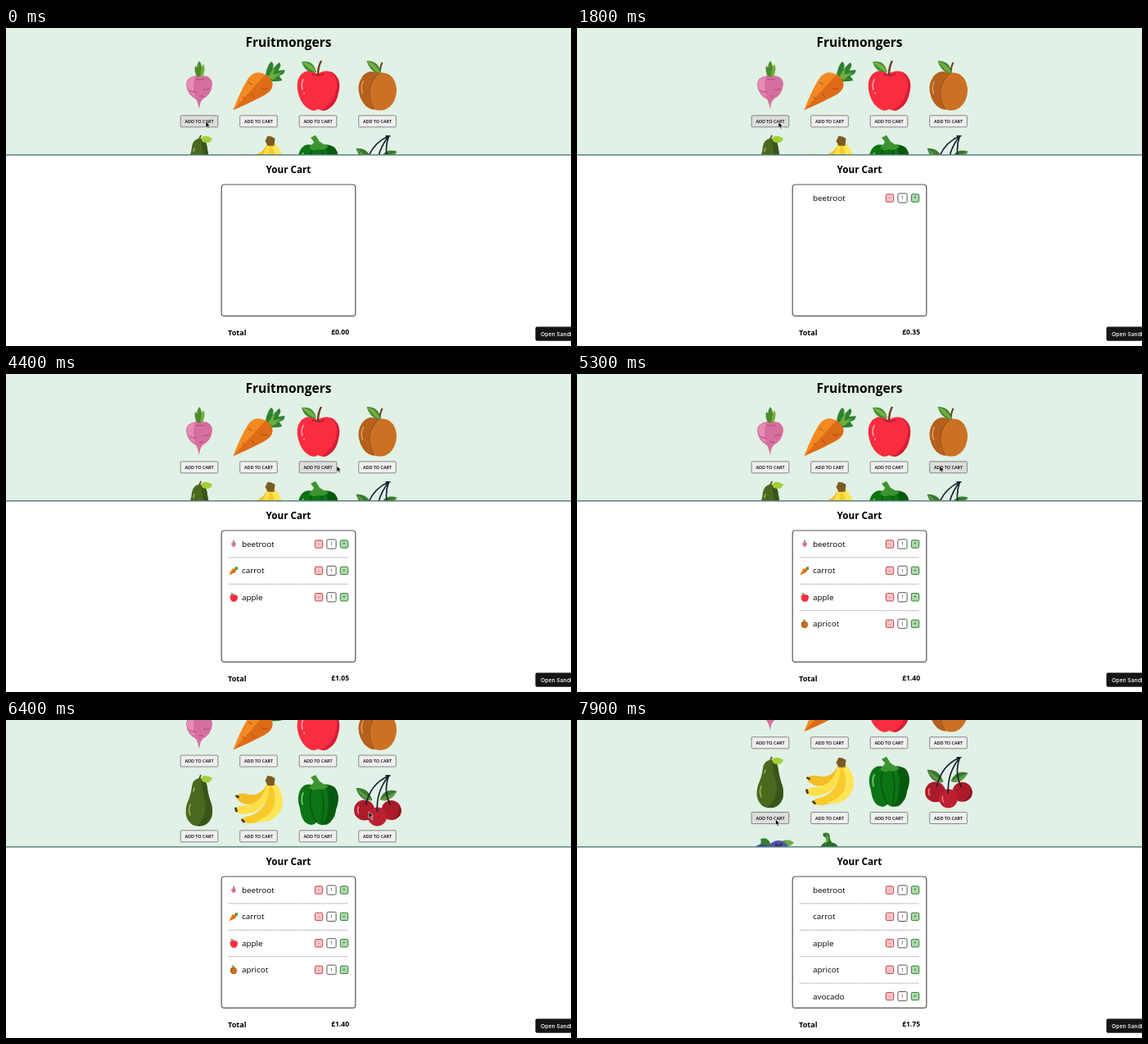
Animation of 690 by 388 pixels, one loop 8000 ms. Source, as an HTML page:

```html
<!DOCTYPE html>
<html lang="en">
<head>
<meta charset="utf-8">
<title>Shopping cart</title>
<style>
html, body { margin: 0; width: 100%; height: 100%; overflow: hidden; background: #fff; }
svg { display: block; width: 100%; height: 100%; }
text { font-family: "Open Sans", "Noto Sans", sans-serif; fill: #000; }
.bold { font-weight: 700; }
.mid { text-anchor: middle; }
.btn rect { fill: #efefef; stroke: #6c6c6c; stroke-width: .8; }
.btn.hover rect { fill: #dcdedc; }
.btn text { font-size: 5.45px; font-weight: 600; }
.step { font-size: 5px; }
</style>
</head>
<body>
<svg id="stage" viewBox="0 0 690 388">
  <defs>
    <clipPath id="shop"><rect width="690" height="154.5"/></clipPath>

    <g id="beetroot">
      <path fill="#4d8a2c" d="M-2-9Q-7-18-5-24Q0-21 0-10ZM-1-10Q-5-24 0-30Q5-25 2-10Z"/>
      <path fill="#76ad38" d="M1-9Q2-22 5-26Q9-20 3-9Z"/>
      <path fill="#d76f9e" d="M-4-12Q0-9 5-12Q16-11 16-1Q15 11 4 17Q1 20 0 29Q-2 20-4 17Q-15 11-16-1Q-16-10-4-12Z"/>
      <path fill="#e58db5" d="M-5-11Q-15-9-15-1Q-13 9-5 14Q-9 0-5-11Z"/>
      <path fill="none" stroke="#a94679" stroke-width="1" d="M5 5Q9 6 12 4M-12 6Q-8 9-4 8M0 13H5M-4-8Q1-5 6-8"/>
    </g>

    <g id="carrot">
      <path fill="#2f8132" d="M8-8Q9-22 15-29Q20-27 17-20L25-28Q29-26 24-18L32-19Q32-13 25-12L29-6Q21-4 13-5Z"/>
      <path fill="#70ae3c" d="M11-9L20-24L18-13L28-16L18-7Z"/>
      <path fill="#f28a22" d="M-31 30Q-22 6-13-8Q-6-18 4-15Q15-12 17-1Q17 7 5 13Q-12 22-31 30Z"/>
      <path fill="#de6b18" d="M-31 30L8-13Q17-8 17-1Q17 7 5 13Q-12 22-31 30Z"/>
      <path fill="none" stroke="#ad4812" stroke-width="1" d="M3 3Q6 6 11 4M-9 10L-5 15M-13 -4L-8-1M-20 14L-16 17"/>
    </g>

    <g id="apple">
      <path fill="#f92c40" d="M-1-14Q-12-22-21-13Q-28-4-24 10Q-20 25-9 30Q-4 32 0 29Q5 32 10 30Q22 24 25 9Q29-6 20-14Q11-21-1-14Z"/>
      <path fill="#d81d36" d="M14-17Q24-12 23 1Q21 20 5 30Q9 32 14 28Q23 22 25 9Q29-6 20-14Q17-17 14-17Z"/>
      <path fill="none" stroke="#8e1525" stroke-width="1.2" d="M-7-14Q0-10 8-14"/>
      <path fill="none" stroke="#6b3b22" stroke-width="2.4" d="M0-12Q0-23 4-30"/>
      <path fill="#3b8a32" d="M-20-29Q-5-31-2-16Q-16-15-20-29Z"/>
      <path fill="#76b342" d="M-20-29Q-6-27-2-16Q-10-18-20-29Z"/>
      <path fill="none" stroke="#ff9aa2" stroke-width="1.7" stroke-linecap="round" d="M-18-7Q-21-2-19 5M-17 9V10"/>
    </g>

    <g id="apricot">
      <path fill="#cb7123" d="M2-15Q-11-20-18-11Q-26 0-21 14Q-16 28-1 30Q14 33 21 18Q27 3 19-9Q12-17 2-15Z"/>
      <path fill="#b5601c" d="M2-15Q-11-20-18-11Q-26 0-21 14Q-16 28-4 30Q-20 6 2-15Z"/>
      <path fill="none" stroke="#964a17" stroke-width="1" d="M2-15Q-18 4-4 29"/>
      <path fill="none" stroke="#e8a968" stroke-width="1.3" stroke-linecap="round" d="M-17-5Q-21 2-18 10"/>
      <path fill="none" stroke="#684021" stroke-width="2" d="M3-14Q3-22 6-28"/>
      <path fill="#3e8733" d="M-13-30Q3-30 4-14Q-9-16-13-30Z"/>
      <path fill="#78ac3e" d="M-13-30Q0-26 4-14Q-4-17-13-30Z"/>
    </g>

    <g id="avocado">
      <path fill="#4b681f" d="M-1-27Q9-28 10-14Q11-6 15 5Q19 23 7 30Q0 33-8 30Q-20 22-15 4Q-10-7-9-17Q-8-25-1-27Z"/>
      <path fill="#3a5419" d="M2-27Q9-26 10-14Q11-6 15 5Q19 23 7 30Q2 32-3 31Q12 17 6-3Q3-15 2-27Z"/>
      <path fill="none" stroke="#6b452b" stroke-width="1.8" d="M0-26L2-31"/>
      <path fill="#a3cf35" d="M2-27Q6-33 16-27Q13-19 4-23Z"/>
      <path fill="none" stroke="#9db25c" stroke-width="1.5" stroke-linecap="round" d="M-11 5Q-14 12-11 18M-6-15L-7-11"/>
    </g>

    <g id="banana">
      <path fill="#f4bd25" d="M10-20Q3-5-12-7Q-24-10-27-5Q-28 0-18 4Q2 9 15-15Z"/>
      <path fill="#ffe04a" d="M10-20Q4 3-14 6Q-26 6-29 10Q-29 16-19 17Q7 17 17-16Z"/>
      <path fill="#f8cb2c" d="M13-20Q14 8-8 18Q-19 20-21 24Q-17 29-7 28Q27 23 19-18Z"/>
      <path fill="#ffe456" d="M15-20Q25 0 16 13Q9 22-3 25Q16 30 27 12Q35-6 18-23Z"/>
      <path fill="#7b5b25" d="M8-24L11-30Q16-30 20-27L19-18L11-18Z"/>
      <path fill="none" stroke="#594020" stroke-width="3" stroke-linecap="round" d="M-27-5L-25-4M-28 10L-27 13M-20 24L-18 26"/>
    </g>

    <g id="pepper">
      <path fill="#0b7414" d="M-3-17Q-14-23-21-14Q-27-4-22 10Q-20 26-12 29Q-6 32-2 27Q4 33 11 28Q20 25 22 11Q28-5 21-15Q13-23-3-17Z"/>
      <path fill="#075910" d="M8-18Q15-8 12 10Q11 24 5 29Q12 32 17 24Q21 20 22 11Q28-5 21-15Q16-20 8-18Z"/>
      <path fill="none" stroke="#064d0d" stroke-width="1.2" d="M-7-16Q-14 5-2 27M3-16Q10 3 4 28"/>
      <path fill="#3d9431" d="M-11-16Q-6-20-5-23L-9-28L-3-31L2-23Q8-19 13-17Q6-11 0-14Q-6-10-11-16Z"/>
      <path fill="none" stroke="#80c374" stroke-width="1.7" stroke-linecap="round" d="M-18-9Q-21-3-19 5"/>
    </g>

    <g id="cherries">
      <path fill="#397a2e" d="M-26-15Q-11-16-6 0Q-21 2-26-15ZM24-11Q9-16 3-1Q15 4 24-11Z"/>
      <path fill="#66994a" d="M-26-15L-6 0Q-16 1-26-15ZM24-11L3-1Q15 4 24-11Z"/>
      <g fill="#ad1b2b"><circle cx="-16" cy="12" r="12.5"/><circle cx="17" cy="12" r="12"/></g>
      <path fill="#8b1423" d="M-8 3Q0 16-14 24Q-2 24-4 11ZM25 4Q30 18 17 24Q31 22 29 10Z"/>
      <circle cy="20" r="11.5" fill="#bd2032"/>
      <path fill="none" stroke="#18212e" stroke-width="1.7" d="M-14 6Q-9-20 14-30Q-2-10 0 14M14-30Q7-11 16 6M10-30H16"/>
      <path fill="none" stroke="#e77a85" stroke-width="1.6" stroke-linecap="round" d="M-23 8Q-25 12-23 16M-7 18Q-8 21-6 24"/>
    </g>

    <g id="berries">
      <path fill="#347f36" d="M-12-22Q-2-27 2-12H-14Q-10-17-12-22Z"/>
      <path fill="#6ba947" d="M12-19Q22-24 29-18Q23-11 15-13Z"/>
      <circle cx="10" cy="-7" r="13.5" fill="#5651a6"/>
      <circle cx="-10" cy="-4" r="12" fill="#454092"/>
      <path fill="#33306f" d="M6-18L10-15L15-18L13-12H6Z"/>
    </g>

    <g id="chilli">
      <path fill="#2a6e25" d="M-8-29Q-2-32 0-27Q0-21 3-18Q10-17 11-10H-12Q-10-17-4-19Q-3-24-8-26Z"/>
      <path fill="#64a043" d="M-5-29Q-1-28-1-20L-6-15Q-3-20-5-29Z"/>
    </g>
  </defs>

  <rect width="690" height="388" fill="#fff"/>
  <rect width="690" height="154.5" fill="#e1f1e5"/>
  <g clip-path="url(#shop)"><g id="list">
    <text class="bold mid" x="345" y="23" font-size="15.5">Fruitmongers</text>
  </g></g>
  <rect y="154.2" width="690" height="1.3" fill="#41716a"/>

  <text class="bold mid" x="345" y="177.4" font-size="11.7">Your Cart</text>
  <rect x="263.2" y="191" width="163.6" height="160.4" rx="3.5" fill="#fff" stroke="#555" stroke-width="1.2"/>
  <g id="cart"></g>
  <text class="bold" x="271" y="375" font-size="9.1">Total</text>
  <text class="bold" id="total" x="419" y="374.2" font-size="8.5" text-anchor="end"></text>

  <rect x="646.5" y="364.5" width="60" height="17.2" rx="2" fill="#151515"/>
  <text x="653" y="375.8" style="font:500 6.8px Inter,sans-serif;fill:#fff">Open Sandbox</text>

  <circle id="ring" r="11" fill="#000" fill-opacity=".04" stroke="#444" stroke-width="1"/>
  <path id="cursor" d="M0 0V7.4L1.7 5.9L2.9 8.6L4.2 8L3 5.4H5.3Z" fill="#000" stroke="#fff" stroke-width=".6"/>
</svg>
<script>
const LOOP = 8000, FRAME = 100, PRICE = 0.35, ROW = 91.75;
const produce = ["beetroot", "carrot", "apple", "apricot",
  "avocado", "banana", "pepper", "cherries", "berries", "chilli"];
const picks = produce.slice(0, 5);
const clicks = [1600, 2800, 3900, 4800, 7600];

// [time, value...]
const path = [[0, 244, 114], [400, 244, 114], [1000, 246, 114.5], [2200, 246, 114.5],
  [2700, 304.5, 116.5], [3200, 304.5, 116.5], [3700, 381, 113], [4200, 381, 113],
  [4400, 404, 112], [4700, 443, 112], [6800, 443, 112], [7500, 242.5, 121]];
const scrolls = [[5500, 0], [5600, 6], [5800, 37.3], [6000, 54], [6100, 57],
  [6200, 57], [6400, 63.8], [6600, 82], [6700, 86]];

const $ = id => document.getElementById(id);
const add = (id, html) => {
  $(id).insertAdjacentHTML("beforeend", html);
  return $(id).lastElementChild;
};

const buttons = [];
produce.forEach((name, i) => {
  const x = 236 + (i % 4) * 72.5, y = 70 + Math.floor(i / 4) * ROW;
  add("list", `<use href="#${name}" x="${x}" y="${y}"/>`);
  const el = add("list", `<g class="btn" transform="translate(${x} ${y + 43.8})">
    <rect x="-22.8" y="-7" width="45.6" height="14" rx="1"/>
    <text class="mid" y="2">ADD TO CART</text></g>`);
  buttons.push({ el, x, y: y + 43.8 });
});

const stepper = (x, size, fill, stroke, label) =>
  `<rect x="${x - size / 2}" y="${-size / 2}" width="${size}" height="${size}" rx="1.5"
    fill="${fill}" stroke="${stroke}" stroke-width="1"/>
  <text class="step mid" x="${x}" y="1.8">${label}</text>`;

const items = picks.map((name, i) => add("cart", `<g transform="translate(0 ${207.5 + i * 32.4})">
  ${i ? '<path d="M272-16H418" stroke="#777" stroke-width=".8" stroke-dasharray="1 .8"/>' : ""}
  <use href="#${name}" transform="translate(278 0) scale(.18)"/>
  <text x="288" y="3.5" font-size="9.86">${name}</text>
  ${stepper(382, 9.4, "#ffc2c5", "#b9474d", "-")}
  ${stepper(397.5, 11.2, "#fff", "#555", "1")}
  ${stepper(413, 9.4, "#aadca9", "#39773b", "+")}</g>`));

function at(keys, t) {
  const n = keys.findIndex(k => k[0] > t);
  if (n === 0) return keys[0].slice(1);
  if (n < 0) return keys[keys.length - 1].slice(1);
  const a = keys[n - 1], b = keys[n], p = (t - a[0]) / (b[0] - a[0]);
  return a.slice(1).map((v, i) => v + (b[i + 1] - v) * p);
}

const show = (el, on) => el.setAttribute("visibility", on ? "visible" : "hidden");
const move = (el, x, y) => el.setAttribute("transform", `translate(${x} ${y})`);

function draw(t) {
  const [x, y] = at(path, t), [scroll] = at(scrolls, t);
  move($("list"), 0, -scroll);
  move($("cursor"), x, y);
  move($("ring"), x, y);
  show($("ring"), clicks.some(c => t >= c && t < c + 200));

  // Hover is only refreshed once the first scroll settles
  const seen = t < 6100 ? 0 : scroll;
  for (const b of buttons)
    b.el.classList.toggle("hover", Math.abs(x - b.x) < 24 && Math.abs(y - b.y + seen) < 7.5);

  // Thumbnails reload after every addition
  const count = clicks.filter(c => t >= c + 200).length;
  const loaded = count > 0 && t >= clicks[count - 1] + 400;
  items.forEach((el, i) => {
    show(el, i < count);
    show(el.querySelector("use"), i < count && loaded);
  });
  $("total").textContent = "£" + (count * PRICE).toFixed(2);
}

const start = performance.now();
function tick() {
  const t = (performance.now() - start) % LOOP;
  draw(Math.floor(t / FRAME) * FRAME);
  requestAnimationFrame(tick);
}
tick();
</script>
</body>
</html>
```
